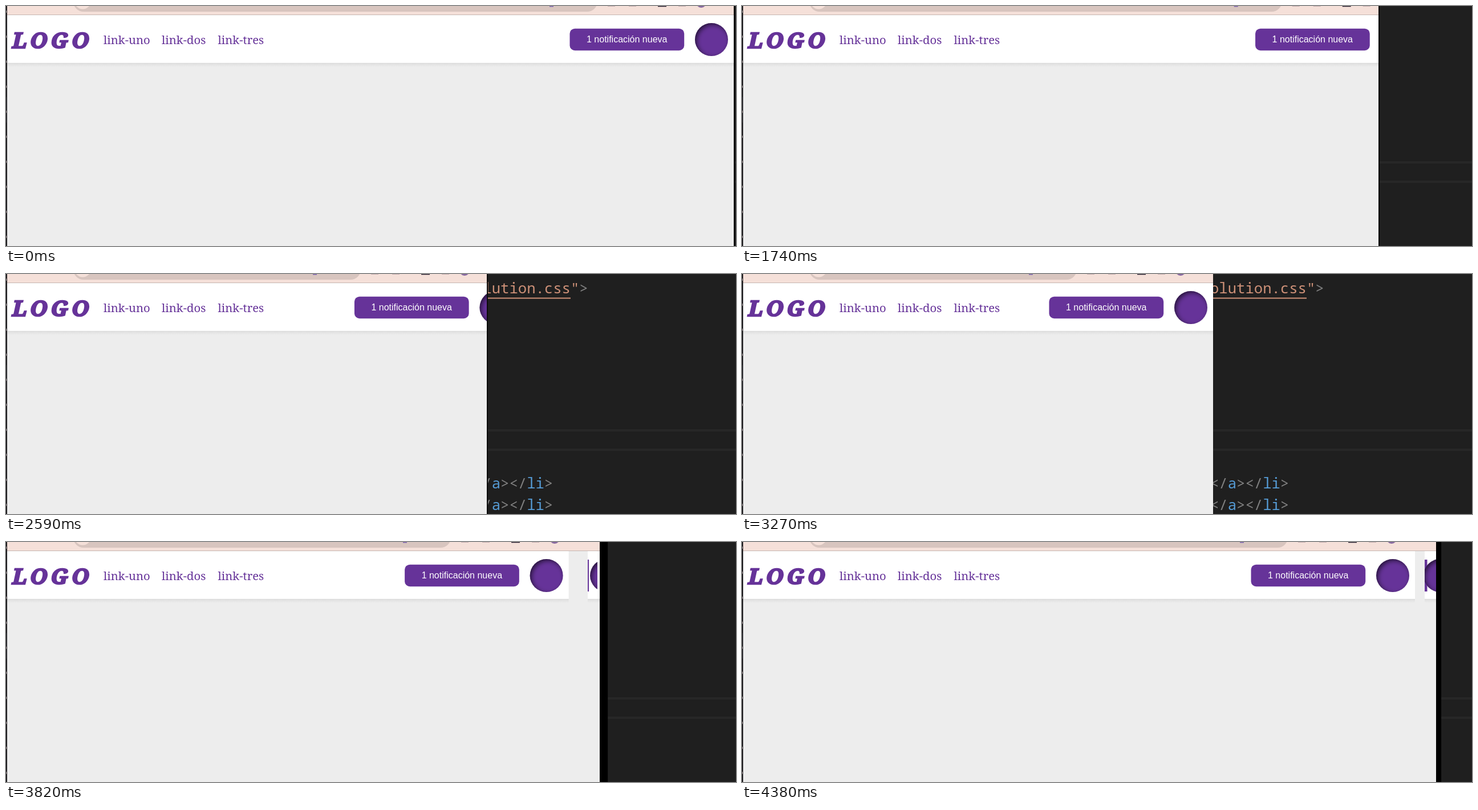
Write an HTML page with a canvas that moves like this. It is 1280 px wide and 422 px high and loops after 4450 ms.

```html
<!DOCTYPE html>
<html lang="es">
<head>
<meta charset="utf-8">
<title>Barra de navegación</title>
<style>
html, body { margin: 0; width: 100%; height: 100%; overflow: hidden; background: #1f1f1f; }
canvas { display: block; }
</style>
</head>
<body>
<canvas id="stage" width="1280" height="422"></canvas>
<script>
const ctx = document.getElementById('stage').getContext('2d');
const LOOP = 4450, H = 422, PURPLE = '#663399';
const WIDE = 1276, NARROW = 826, TURN = 3270;
const STEP = 70, PAUSES = [0, 1390, 2520, TURN, 3820];

// the screen refreshes in steps, counted anew after each pause
function snap(t) {
  const from = PAUSES.filter(p => t >= p).pop();
  return from + Math.floor((t - from) / STEP) * STEP;
}

// share of a decelerating move still to go
function rest(t, start, end, power) {
  const u = Math.min(1, Math.max(0, (t - start) / (end - start)));
  return (1 - u) ** power;
}

const shrink = (t, start, end, power) => NARROW + (WIDE - NARROW) * rest(t, start, end, power);
const grow = (t, start, power) => WIDE - (WIDE - NARROW) * rest(t, start, 4700, power);

// frame leads; painted edge, toolbar and page layout lag behind it
function layout(t) {
  if (t < TURN) {
    const edge = shrink(t, 1390, 2730, 1.45);
    return {
      edge,
      frame: edge > NARROW ? edge + 2 : edge,
      tools: shrink(t, 1535, 2730, 1.19),
      page: shrink(t, 1480, 2803, 1)
    };
  }
  return {
    frame: grow(t, 3272, 1.47),
    edge: grow(t, 3284, 1.366),
    tools: grow(t, 3270, 1.154),
    page: grow(t, 3381, 1.091)
  };
}

function box(x, y, w, h, color) {
  ctx.fillStyle = color;
  ctx.fillRect(x, y, w, h);
}

function pill(x, y, w, h, r, color) {
  ctx.fillStyle = color;
  ctx.beginPath();
  ctx.roundRect(x, y, w, h, r);
  ctx.fill();
}

function disc(x, y, r, color) {
  ctx.fillStyle = color;
  ctx.beginPath();
  ctx.arc(x, y, r, 0, Math.PI * 2);
  ctx.fill();
}

function text(s, x, y, font, color) {
  ctx.font = font;
  ctx.fillStyle = color;
  ctx.fillText(s, x, y);
}

function clipped(x, y, w, h, paint) {
  ctx.save();
  ctx.beginPath();
  ctx.rect(x, y, w, h);
  ctx.clip();
  paint();
  ctx.restore();
}

function code(x, y, parts) {
  const font = '25.6px "Noto Sans Mono", "DejaVu Sans Mono", monospace';
  for (const [s, color] of parts) {
    text(s, x, y, font, color);
    x += ctx.measureText(s).width;
  }
}

function editor() {
  const gray = '#808080', blue = '#569cd6', orange = '#ce9178';
  box(0, 0, 1280, H, '#1f1f1f');
  code(821, 34, [['olution.css"', orange], ['>', gray]]);
  box(700, 41.5, 290, 2, orange);
  for (const y of [273, 307]) box(0, y, 1280, 4, '#272727');
  for (const y of [377, 415]) {
    code(821, y, [['</', gray], ['a', blue], ['></', gray], ['li', blue], ['>', gray]]);
  }
}

function toolbar(w, edge) {
  const pink = '#f5e0d9';
  box(2, 0, edge - 2, 15, pink);
  box(2, 15, edge - 2, 1, '#c6b5b1');
  pill(118, -26, w - 357, 36, 18, '#d8c5bf');
  disc(134.5, -9, 14.5, pink);
  box(w - 323, 0, 7, 1.5, '#7a62ab');
  for (const x of [221, 184, 97]) box(w - x, 0, 13, 1, '#c4acae');
  box(w - 133, 0, 15, 1.3, '#1c1526');
  disc(w - 57, -6, 9, '#86689f');
}

function avatar(x, y) {
  const r = 29;
  disc(x, y, r, PURPLE);
  ctx.save();
  ctx.beginPath();
  ctx.arc(x, y, r, 0, Math.PI * 2);
  ctx.clip();
  ctx.shadowColor = 'rgba(0,0,0,.65)';
  ctx.shadowBlur = 8;
  ctx.shadowOffsetX = 3;
  ctx.shadowOffsetY = 3;
  ctx.fillStyle = PURPLE;
  ctx.beginPath();
  ctx.rect(x - 60, y - 60, 120, 120);
  ctx.arc(x, y, r + 0.5, 0, Math.PI * 2, true);
  ctx.fill();
  ctx.restore();
}

function bar(x, w) {
  const shade = ctx.createLinearGradient(0, 100, 0, 107);
  shade.addColorStop(0, 'rgba(0,0,0,.07)');
  shade.addColorStop(1, 'rgba(0,0,0,0)');
  box(x, 100, w, 7, shade);
  box(x, 16, w, 84, '#fff');
}

function title(x, y) {
  ctx.letterSpacing = '5.5px';
  text('LOGO', x, y, 'italic 900 39px "Noto Serif", serif', PURPLE);
  ctx.strokeStyle = PURPLE;
  ctx.lineWidth = 2.6;
  ctx.strokeText('LOGO', x, y);
  ctx.letterSpacing = '0px';
}

function header(w) {
  const serif = '300 20.3px "Noto Serif", serif';
  bar(2, w - 2);
  title(11, 74);
  text('link-uno', 171, 67, serif, PURPLE);
  text('link-dos', 273, 67, serif, PURPLE);
  text('link-tres', 371.5, 67, serif, PURPLE);
  pill(w - 287.5, 39.7, 200.7, 38.5, 9, PURPLE);
  text('1 notificación nueva', w - 258, 64, '16px "Liberation Sans", Arial, sans-serif', '#fff');
  avatar(w - 39, 59);
}

// strip of stale header that trails a growing window
function trail(x, edge, frame) {
  if (edge <= x) return;
  const gap = frame - edge;
  const cut = edge - Math.max(0, gap - 9) * 0.8;
  bar(x, edge - x);
  if (cut <= x) return;
  clipped(x, 16, cut - x, 84, () => {
    box(x, 31, Math.max(2, 9 - gap / 2), 56, PURPLE);
    avatar(frame - 2, 59);
  });
}

// slivers of the editor left of the window
function leftRim() {
  box(0, 0, 2, H, '#1b1a1d');
  box(0, 160, 1, 45, '#303034');
  for (let y = 8; y < H; y += 44) box(0, y, 1, 4, '#a89a9c');
}

function draw(now) {
  const t = snap(now % LOOP);
  const { frame, edge, tools, page } = layout(t);
  const growing = t > TURN;
  editor();
  if (frame > edge) box(edge, 0, frame - edge, H, growing ? '#000' : '#0d0d0d');
  clipped(0, 0, edge, H, () => {
    box(2, 16, edge, H, '#ededed');
    header(page);
    if (growing) trail(tools + 1, edge, frame);
    toolbar(tools, edge);
  });
  leftRim();
}

const start = performance.now();
function tick() {
  draw(performance.now() - start);
  requestAnimationFrame(tick);
}
tick();
</script>
</body>
</html>
```
